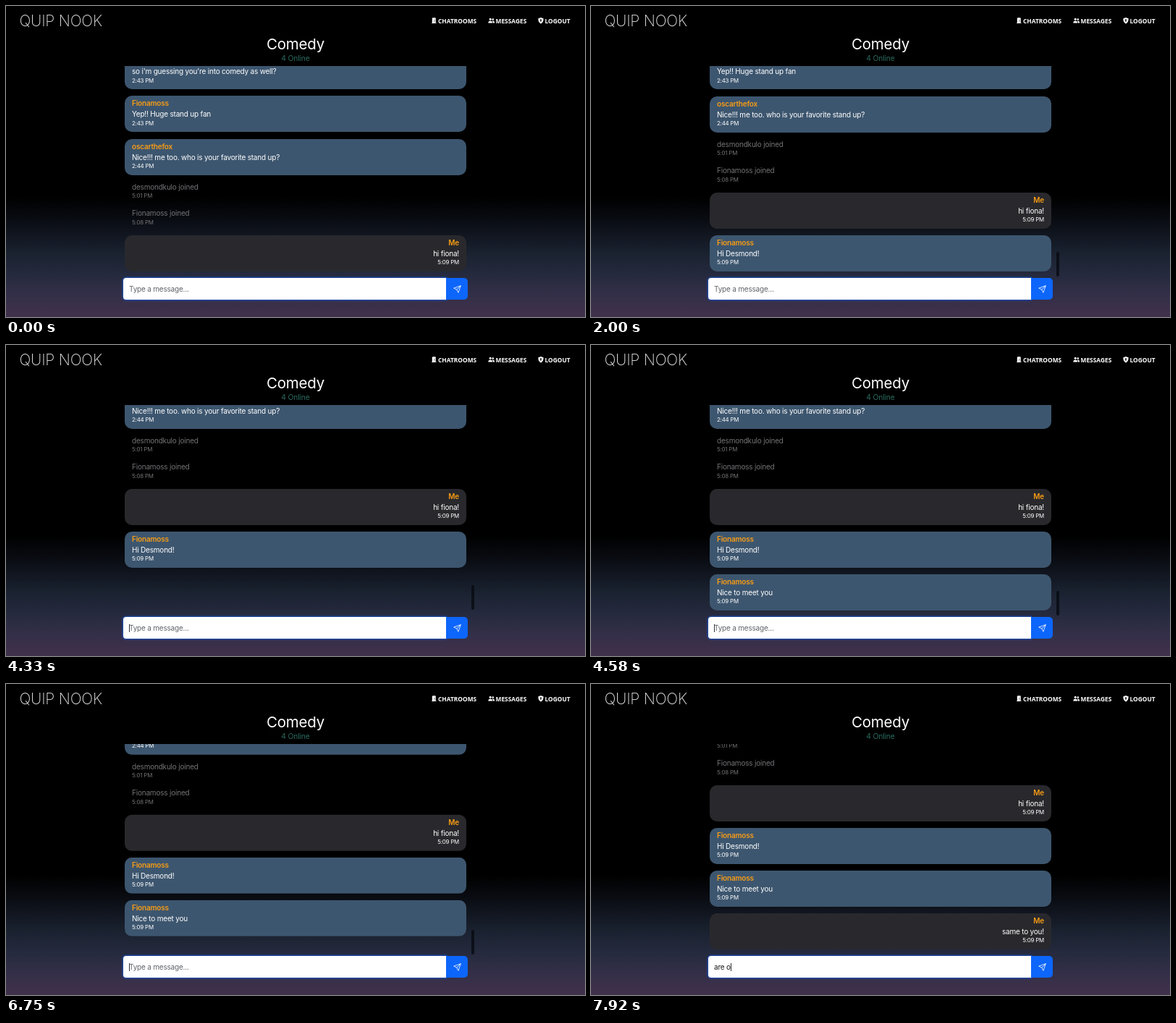
Recreate the animation shown at these times as an HTML page. Size 800 by 430 pixels, loop 8 s.

```html
<!DOCTYPE html>
<html lang="en">
<head>
<meta charset="utf-8">
<title>Chat room</title>
<style>
  html, body { margin: 0; width: 100%; height: 100%; overflow: hidden; background: #000; }
  #stage {
    position: relative; width: 800px; height: 430px; overflow: hidden;
    background: linear-gradient(#000 0 264px, #0b0e15 300px, #1a2230 342px, #252a3e 372px, #332f48 400px, #3f304b 424px);
    color: #fff; font: 10px/15px Inter, sans-serif; letter-spacing: -.02em; font-optical-sizing: none;
  }
  #stage > * { position: absolute; }
  .brand { left: 18.5px; top: 5.5px; font-size: 21px; line-height: 30px; font-weight: 200; color: #e8e8e8; white-space: nowrap; }
  .link { top: 14px; font: 600 8.4px/13px "Noto Sans", sans-serif; letter-spacing: 0; white-space: nowrap; }
  h1 { left: 0; width: 800px; top: 38px; margin: 0; font-size: 20.5px; line-height: 30px; font-weight: 400; text-align: center; }
  .online { left: 0; width: 800px; top: 65px; font-size: 10.4px; text-align: center; color: #29695d; }

  .view { left: 158px; top: 83px; width: 484px; height: 292px; overflow: hidden; }
  .list { position: absolute; left: 6px; top: -83px; width: 472px; animation: scroll 8s infinite; }
  .msg {
    position: absolute; left: 0; box-sizing: border-box; width: 472px; height: 50px;
    padding: 3px 10px 0; border-radius: 10px; background: #3d566f; white-space: nowrap;
  }
  .msg b { display: block; font-weight: 600; color: #f99d14; }
  .msg p { margin: 0; }
  .msg small { display: block; margin-top: -.5px; font-size: 7.9px; line-height: 11px; }
  .me { background: #29292d; text-align: right; }
  .note { height: auto; padding-top: 0; background: none; color: #737377; }
  .late1 { animation: show1 8s infinite; }
  .late2 { animation: show2 8s infinite; }
  .late3 { animation: show3 8s infinite; }
  .bar { left: 642.5px; top: 340px; width: 4.5px; height: 34px; border-radius: 2px; background: rgba(8, 10, 16, .8); animation: bar 8s infinite; }

  .field {
    left: 162px; top: 375.5px; box-sizing: border-box; width: 446px; height: 30px; padding-left: 8px;
    border-radius: 4px 0 0 4px; background: #fff; color: #16181b;
    line-height: 30px; white-space: pre; box-shadow: 0 0 1.5px 1.5px rgba(18, 88, 225, .6);
  }
  #caret { display: inline-block; width: 1px; height: 11px; margin-right: -1px; background: #333; vertical-align: -2px; }
  #hint { color: #5f6368; }
  .send { left: 607.5px; top: 375.5px; width: 30.5px; height: 30px; border-radius: 0 5px 5px 0; background: #0d66fb; }
  .send svg { position: absolute; left: 10px; top: 10px; }

  @keyframes scroll {
    0%, 21.125% { transform: translateY(0); animation-timing-function: ease-out; }
    23.375%, 51.4375% { transform: translateY(-59px); animation-timing-function: ease-out; }
    53.6875%, 83.9375% { transform: translateY(-118px); animation-timing-function: ease-out; }
    86.1875%, 100% { transform: translateY(-177px); }
  }
  @keyframes show1 { 0%, 24.125% { opacity: 0; } 24.8%, 100% { opacity: 1; } }
  @keyframes show2 { 0%, 54.4375% { opacity: 0; } 55.125%, 100% { opacity: 1; } }
  @keyframes show3 { 0%, 86.9375% { opacity: 0; } 87.625%, 100% { opacity: 1; } }
  @keyframes bar {
    0%, 21.125% { opacity: 0; transform: none; }
    21.5%, 26% { opacity: 1; transform: none; }
    27.1% { opacity: 0; transform: none; }
    51.4375% { opacity: 0; transform: translateY(-8px); }
    51.8%, 54.2% { opacity: 1; transform: translateY(-8px); }
    55.2%, 59% { opacity: 1; transform: none; }
    60.3%, 83.9375% { opacity: 0; transform: none; }
    84.3%, 90% { opacity: 1; transform: none; }
    91.5%, 100% { opacity: 0; transform: none; }
  }
</style>
</head>
<body>
<div id="stage">
  <div class="brand">QUIP NOOK</div>

  <svg width="800" height="40" fill="#fff">
    <path d="M588.2 24v-.8h.6v-6.6l4-.7v8.1zM593.2 16.6h.8v6.6h.6v.8h-1.4z"/>
    <circle cx="591.7" cy="20.3" r=".5" fill="#000"/>
    <circle cx="669.2" cy="18.3" r="1.5"/>
    <circle cx="672.8" cy="18.5" r="1.3"/>
    <path d="M666.3 23.4c0-3.8 5.9-3.8 5.9 0zM672.8 23.4c0-1.3-.4-2.1-1-2.7 2-.6 3.3.7 3.3 2.7z"/>
    <path d="M739 15.9l3.6 1.3c.2 3.5-1 5.8-3.6 7.2-2.6-1.4-3.8-3.7-3.6-7.2z"/>
    <circle cx="739" cy="19.2" r="1" fill="#000"/>
    <path d="M738.6 19.5h.8l.3 2.3h-1.4z" fill="#000"/>
  </svg>
  <div class="link" style="left:597px">CHATROOMS</div>
  <div class="link" style="left:676.5px">MESSAGES</div>
  <div class="link" style="left:744.5px">LOGOUT</div>

  <h1>Comedy</h1>
  <div class="online">4 Online</div>

  <div class="view">
    <div class="list">
      <div class="msg" style="top:65.3px"><b>oscarthefox</b><p>so i'm guessing you're into comedy as well?</p><small>2:43 PM</small></div>
      <div class="msg" style="top:124.3px"><b>Fionamoss</b><p>Yep!! Huge stand up fan</p><small>2:43 PM</small></div>
      <div class="msg" style="top:183.5px"><b>oscarthefox</b><p>Nice!!! me too. who is your favorite stand up?</p><small>2:44 PM</small></div>
      <div class="msg note" style="top:242.5px"><p>desmondkulo joined</p><small>5:01 PM</small></div>
      <div class="msg note" style="top:279.3px"><p>Fionamoss joined</p><small>5:08 PM</small></div>
      <div class="msg me" style="top:316.6px"><b>Me</b><p>hi fiona!</p><small>5:09 PM</small></div>
      <div class="msg late1" style="top:375.6px"><b>Fionamoss</b><p>Hi Desmond!</p><small>5:09 PM</small></div>
      <div class="msg late2" style="top:434.8px"><b>Fionamoss</b><p>Nice to meet you</p><small>5:09 PM</small></div>
      <div class="msg me late3" style="top:493.8px"><b>Me</b><p>same to you!</p><small>5:09 PM</small></div>
    </div>
  </div>
  <div class="bar"></div>

  <div class="field"><span id="typed"></span><i id="caret"></i><span id="hint">Type a message...</span></div>
  <div class="send">
    <svg width="11" height="11" viewBox="0 0 16 16" fill="none" stroke="#fff" stroke-width="1.2" stroke-linejoin="round">
      <path d="M15 1L10 15 7 9 1 6zM7 9l8-8"/>
    </svg>
  </div>
</div>

<script>
  const LOOP = 8000, BLINK = 333;
  const [typed, caret, hint] = ['typed', 'caret', 'hint'].map(id => document.getElementById(id));

  // Each key: [time, field content after it]
  const reply = 'same to you!';
  const keys = [
    [300, ''],
    ...[...reply].map((c, i) => [5710 + i * 76, reply.slice(0, i + 1)]),
    [6715, ''],
    [7230, 'a'], [7310, 'ar'], [7390, 'are'], [7465, 'are '],
    [7635, 'are o'], [7715, 'are ou'], [7880, 'are o']
  ];

  function draw(t) {
    let key = keys[0];
    for (const k of keys) if (k[0] <= t) key = k;
    typed.textContent = key[1];
    hint.style.display = key[1] ? 'none' : '';
    // The caret stays solid after a key, then blinks
    const beat = Math.floor((t - key[0]) / BLINK);
    caret.style.visibility = beat % 2 ? 'hidden' : 'visible';
  }

  let start;
  function tick(now) {
    start ??= now;
    draw((now - start) % LOOP);
    requestAnimationFrame(tick);
  }
  draw(0);
  requestAnimationFrame(tick);
</script>
</body>
</html>
```
